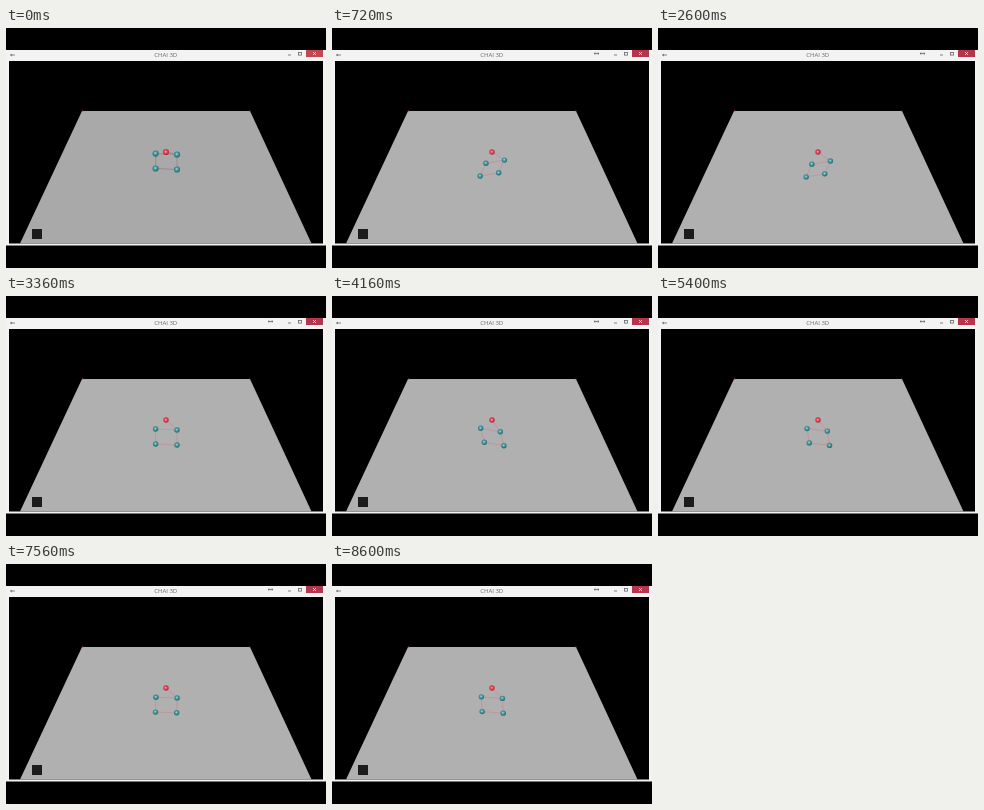
An HTML page for the animation above (8.64 s loop, 320 px wide and 240 px high).

```html
<!DOCTYPE html>
<html lang="en">
<head>
<meta charset="utf-8">
<title>Spring mesh</title>
<style>
  html, body { margin: 0; width: 100%; height: 100%; overflow: hidden; background: #000; }
  svg { display: block; width: 100vw; height: 100vh; }
  text { font: 6px "Open Sans", "Noto Sans", sans-serif; fill: #666; }
  #floor { fill: #b0b0b0; }
  .start #floor { fill: #a9a9a9; }
  .start #resize { visibility: hidden; }
  #close { fill: #b5364c; }
  .start #close { fill: #c2484f; }
  #links { fill: none; stroke: #c9848f; stroke-width: .7; opacity: .8; }
  .start #links { stroke: #927078; }
</style>
</head>
<body>
<svg id="stage" viewBox="0 0 320 240">
  <defs>
    <radialGradient id="teal" cx=".45" cy=".42" r=".58">
      <stop offset="0" stop-color="#b4d8d8"/>
      <stop offset=".42" stop-color="#4a9a9f"/>
      <stop offset="1" stop-color="#1d6a70"/>
    </radialGradient>
    <radialGradient id="red" cx=".45" cy=".45" r=".58">
      <stop offset="0" stop-color="#f3bcc4"/>
      <stop offset=".42" stop-color="#d8485a"/>
      <stop offset="1" stop-color="#b81d34"/>
    </radialGradient>
  </defs>
  <rect width="320" height="240"/>
  <rect y="22" width="320" height="195.5" fill="#f3f3f3"/>
  <rect x="3" y="33" width="314" height="182.5"/>
  <path id="floor" d="M76 83H244L305.5 215.5H14Z"/>
  <path d="M76 83h1.2m166 0h1.2" stroke="#b03a42"/>
  <rect x="26" y="201" width="10" height="10" fill="#1c1c1c"/>

  <text x="159.7" y="29.2" text-anchor="middle">CHAI 3D</text>
  <g fill="none" stroke="#666" stroke-width=".8">
    <path d="M4.5 27h4.5M4.5 27l1.5-1M4.5 27l1.5 1M282 27h3"/>
    <rect x="292.5" y="24.5" width="3" height="2.6"/>
    <path id="resize" d="M262 25.5h5M263.3 24.5l-1.3 1 1.3 1M265.7 24.5l1.3 1-1.3 1"/>
  </g>
  <rect id="close" x="300" y="22" width="17" height="7"/>
  <path d="M307 24l3 3m0-3l-3 3" stroke="#eee" stroke-width=".8"/>

  <path id="links"/>
  <g id="nodes" fill="url(#teal)">
    <circle/><circle/><circle/><circle/>
  </g>
  <circle id="anchor" cx="160" cy="124" fill="url(#red)"/>
</svg>
<script>
  const LOOP = 8640, PERIOD = 640, DAMPING = 3000;
  const CENTER = { x: 160.3, y: 141 };
  const stage = document.getElementById("stage");
  const links = document.getElementById("links");
  const anchor = document.getElementById("anchor");
  const nodes = [...document.querySelectorAll("#nodes circle")];

  // Corners run clockwise from the top left.
  function corner(i, t) {
    const side = i === 1 || i === 2 ? 1 : -1;
    const level = i > 1 ? 1 : -1;
    const dx = side * 10.7;
    const dy = level * 7.5 + side * .5;

    // The mesh drops to rest while its diagonals squeeze in turn.
    const lift = 7.5 * Math.exp(-t / 350);
    const swing = Math.min(1, t / 1000) * Math.exp((1600 - t) / DAMPING)
      * Math.cos((t - 1600) / PERIOD * 2 * Math.PI);
    const k = i % 2 ? swing : -swing;
    const scale = 1 - (k > 0 ? .6 : .2) * k;
    return { x: CENTER.x + dx * scale, y: CENTER.y + dy * scale - lift };
  }

  function draw(now) {
    const t = now % LOOP;
    const start = t < 80;
    const r = start ? 3.1 : 2.7;
    stage.classList.toggle("start", start);
    anchor.setAttribute("r", r);
    const p = nodes.map((node, i) => {
      const { x, y } = corner(i, t);
      node.setAttribute("cx", x);
      node.setAttribute("cy", y);
      node.setAttribute("r", r);
      return x + " " + y;
    });
    links.setAttribute("d", `M${p.join("L")}ZM160 124L${p[1]}`);
  }

  function tick() {
    draw(performance.now());
    requestAnimationFrame(tick);
  }
  tick();
</script>
</body>
</html>
```
